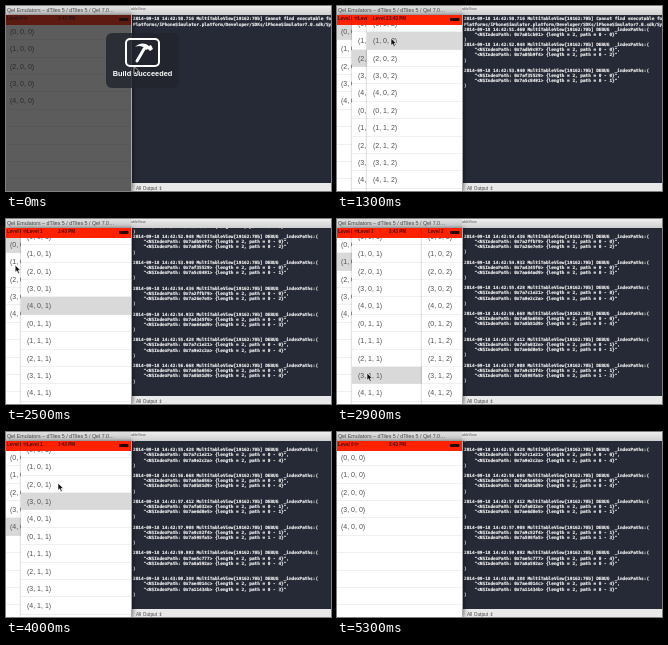
An HTML page for the animation above (5.5 s loop, 325 px wide and 185 px high).

```html
<!DOCTYPE html>
<html lang="en">
<head>
<meta charset="utf-8">
<title>Stacked table panels</title>
<style>
  html, body { margin: 0; width: 100%; height: 100%; overflow: hidden; background: #d4d4d4; }
  #stage { position: absolute; left: 0; top: 0; width: 325px; height: 185px; overflow: hidden; font-family: "Liberation Sans", Arial, sans-serif; }
  #stage div, #stage svg, pre { position: absolute; left: 0; top: 0; margin: 0; white-space: pre; }
  #stage .bar { width: 325px; height: 9px; background: linear-gradient(#efedef, #cfcfcf); }
  #stage #title { width: 125px; height: 9px; overflow: hidden; font-size: 5.3px; line-height: 8px; color: #444; text-indent: 1px; background: linear-gradient(#e0e0e0, #c4c4c4); }
  #stage #doc { left: 125px; font-size: 3.6px; line-height: 6px; color: #555; }
  #stage #console { left: 126px; top: 9px; width: 199px; height: 168px; overflow: hidden; background: #262a36; }
  #stage #log { left: 1px; top: 1.4px; font: bold 4.4px/5.15px "DejaVu Sans Mono", monospace; color: #f4f4f4; -webkit-text-stroke: .15px #f4f4f4; }
  #stage #foot { left: 126px; top: 177px; width: 199px; height: 8px; background: #e9e9e9; font-size: 4.8px; line-height: 11px; color: #444; text-indent: 4px; }
  #stage #window { top: 9px; width: 126px; height: 176px; background: #a8a8a8; box-shadow: 1px 0 4px rgba(0,0,0,.5); }
  #stage #phone { width: 125px; height: 176px; overflow: hidden; background: #fff; }
  .panel { width: 125px; height: 176px; background: #fff; }
  .over { box-shadow: 0 0 2px rgba(0,0,0,.35); }
  .row { width: 125px; height: 17.4px; font-size: 7px; line-height: 17.4px; color: #505050; box-shadow: inset 0 -.4px #e2e2e2; }
  .row.on { background: #d9d9d9; }
  .head { width: 125px; height: 9.5px; background: #ff2200; font-size: 4.6px; line-height: 8.6px; font-weight: bold; color: #4a0a04; }
  #stage #clock { left: 52px; font-size: 4.5px; line-height: 8.6px; font-weight: bold; color: #4a0a04; }
  #dim { width: 125px; height: 176px; background: #171717; }
  #stage #hud { left: 100px; top: 27px; width: 73px; height: 55px; border-radius: 6px; background: rgba(33,36,44,.82); }
  #stage #hud div { top: 36px; width: 73px; text-align: center; font-weight: bold; font-size: 7.4px; line-height: 10px; color: #fff; }
</style>
</head>
<body>
<div id="stage">
  <div class="bar"></div>
  <div id="doc">ableView</div>
  <div id="console"><pre id="log"></pre></div>
  <div id="foot">All Output ⇕</div>
  <div id="title">Qel Emulators – dTiles 5 / dTiles 5 / Qel 7.0…</div>
  <div id="window"><div id="phone"></div></div>
  <div id="hud">
    <svg width="73" height="37">
      <rect x="20" y="6" width="33" height="27" rx="4" fill="none" stroke="#fff" stroke-width="2"/>
      <path d="M29 14q5-5 11-3l3 2 2-1 2 4-3 2-2-2-2 1-3-3q-4-2-8 0z" fill="#fff"/>
      <path d="M38 16L31 28" stroke="#fff" stroke-width="3" stroke-linecap="round"/>
    </svg>
    <div>Build Succeeded</div>
  </div>
  <svg id="cursor" width="30" height="30" viewBox="-15 -15 30 30">
    <circle id="press" r="8.5" fill="rgba(255,255,255,.3)" stroke="#222" stroke-width="1.3"/>
    <path d="M-2-3.5v7.2l1.7-1.5 1.2 2.7 1.4-.6-1.2-2.6h2.3z" fill="#111" stroke="#fff" stroke-width=".6"/>
  </svg>
</div>
<template id="status">
  <svg width="125" height="9">
    <path d="M17 3q2.5-2 5 0M18 4.2q1.5-1 3 0M19.5 5.3v.3" fill="none" stroke="#4a0a04" stroke-width=".7"/>
    <rect x="113" y="3" width="9.5" height="3" rx="1" fill="#2a0804"/>
  </svg>
  <div id="clock">3:43 PM</div>
</template>
<script>
const LOOP = 5500, STEP = 100, END = 4900;
const ROW = 17.4, LINE = 5.15, HIDDEN = 140, INSET = 6;
const OPEN = 200, DRAG = 300;
const $ = id => document.getElementById(id);
const clamp = p => Math.min(1, Math.max(0, p));
const smooth = p => p * p * (3 - 2 * p);
const easeOut = p => 1 - (1 - p) ** 5;

const rest = level => 15 * level;
const rowTop = (level, n) => (level ? -.2 : 7.8) + n * ROW;

// The whole session: rows tapped, and panels dragged away to the right.
const tap = (at, level, row) => ({ at, level, row });
const back = (at, level) => ({ at, level, drag: true });
const session = [
  tap(300, 0, 0), tap(900, 1, 2),
  ...[1, 2, 3, 4].map(n => tap(1100 + 200 * n, 2, n)),
  back(2000, 2), tap(2400, 1, 4), tap(2700, 0, 1), tap(2900, 1, 8),
  back(3200, 2), tap(3700, 0, 4), tap(3900, 1, 3),
  back(4250, 2), back(4600, 1)
];
const taps = session.filter(e => !e.drag);

// A tap opens the next panel and closes any deeper one.
const moves = session.flatMap(({ at, level, drag }) => drag
  ? [{ level, at, len: DRAG, to: HIDDEN }]
  : [1, 2].filter(n => n > level).map(n =>
      ({ level: n, at: at + 100, len: OPEN, to: n === level + 1 ? rest(n) : HIDDEN })));

const panelX = (level, t) => moves.filter(m => m.level === level).reduce(
  (x, m) => x + (m.to - x) * smooth(clamp((t - m.at) / m.len)), level ? HIDDEN : 0);

function picksAt(t) {
  const picks = [-1, -1, -1];
  for (const { at, level, row, drag } of session) {
    if (at > t) break;
    picks.fill(-1, level);
    if (!drag) picks[level] = row;
  }
  return t < END ? picks : [];
}

function pointerAt(t) {
  let x = 130, y = 64, from = 0;
  for (const { at, level, row, drag } of session) {
    const toX = drag ? rest(level) + 29 : 8 + 24 * level;
    const toY = drag ? 51 : 9 + rowTop(level, row + .55);
    const p = easeOut(clamp((t - from) / (at - from)));
    x += (toX - x) * p;
    y += (toY - y) * p;
    if (t < at) break;
    from = at;
    if (drag) {
      x += (HIDDEN - rest(level)) * smooth(clamp((t - at) / DRAG));
      from += DRAG;
      if (t < from) break;
    }
  }
  return [x, y];
}

function make(cls, parent, text = "") {
  const el = document.createElement("div");
  el.className = cls;
  el.textContent = text;
  parent.append(el);
  return el;
}

const panels = [0, 1, 2].map(level => {
  const box = make(level ? "panel over" : "panel", $("phone"));
  const inset = level ? INSET : 4;
  box.rows = Array.from({ length: 11 }, (_, n) => {
    const used = n < (level ? 10 : 5);
    const row = make("row", box, used ? `(${n % 5}, ${Math.floor(n / 5)}, ${level})` : "");
    row.style.top = rowTop(level, n) + "px";
    row.style.textIndent = inset + "px";
    return row;
  });
  make("head", box, `Level ${level}`).style.textIndent = (level ? INSET : 1) + "px";
  return box;
});
$("phone").append($("status").content);
const dim = make("", $("phone"));
dim.id = "dim";

let seed = 7;
const address = () => {
  seed = (seed * 16807) % 2147483647;
  return "0x7a" + (seed % 0x1000000).toString(16).padStart(6, "0");
};

function stamp(t) {
  const s = 50.716 + t * .00248;
  const minute = 42 + Math.floor(s / 60);
  return `2014-09-18 14:${minute}:${(s % 60).toFixed(3).padStart(6, "0")} MultiTableView[19162:70b] `;
}
const intro = [
  stamp(0) + "Cannot find executable for CFBundle",
  "Platforms/iPhoneSimulator.platform/Developer/SDKs/iPhoneSimulator7.0.sdk/System"
];
const entries = taps.map(({ at, row }, i) => {
  const cell = `${Math.floor(row / 5)} - ${row % 5}`;
  const paths = i ? [`0 - ${picksAt(at)[0]}`, cell] : [cell];
  const items = paths.map(p => `    "<NSIndexPath: ${address()}> {length = 2, path = ${p}}"`);
  return [stamp(at) + "DEBUG  _indexPaths:(", ...items.join(",\n").split("\n"), ")", ...(i ? [""] : [])];
});

let shown = -1;
function showLog(count) {
  if (count === shown) return;
  shown = count;
  const lines = intro.concat(...entries.slice(0, count));
  const shift = Math.max(0, 13 + (lines.length - 5) * LINE - 146);
  $("log").textContent = lines.join("\n");
  $("log").style.transform = `translateY(${-shift}px)`;
}

function draw(t) {
  const picks = picksAt(t);
  panels.forEach((box, level) => {
    box.style.transform = `translateX(${panelX(level, t)}px)`;
    box.rows.forEach((row, n) => row.classList.toggle("on", n === picks[level]));
  });
  showLog(taps.filter(e => e.at <= t).length);

  const fade = clamp((300 - t) / 200);
  dim.style.opacity = .7 * fade;
  $("hud").style.opacity = fade;

  const [x, y] = pointerAt(t);
  $("cursor").style.transform = `translate(${x - 15}px, ${y - 15}px)`;
  $("cursor").style.opacity = t < END ? 1 : 0;
  $("press").style.opacity = session.some(e => e.drag && t >= e.at && t < e.at + DRAG) ? 1 : 0;
}

const start = performance.now();
function tick() {
  const t = (performance.now() - start) % LOOP;
  draw(Math.floor(t / STEP) * STEP);
  requestAnimationFrame(tick);
}
tick();
</script>
</body>
</html>
```
